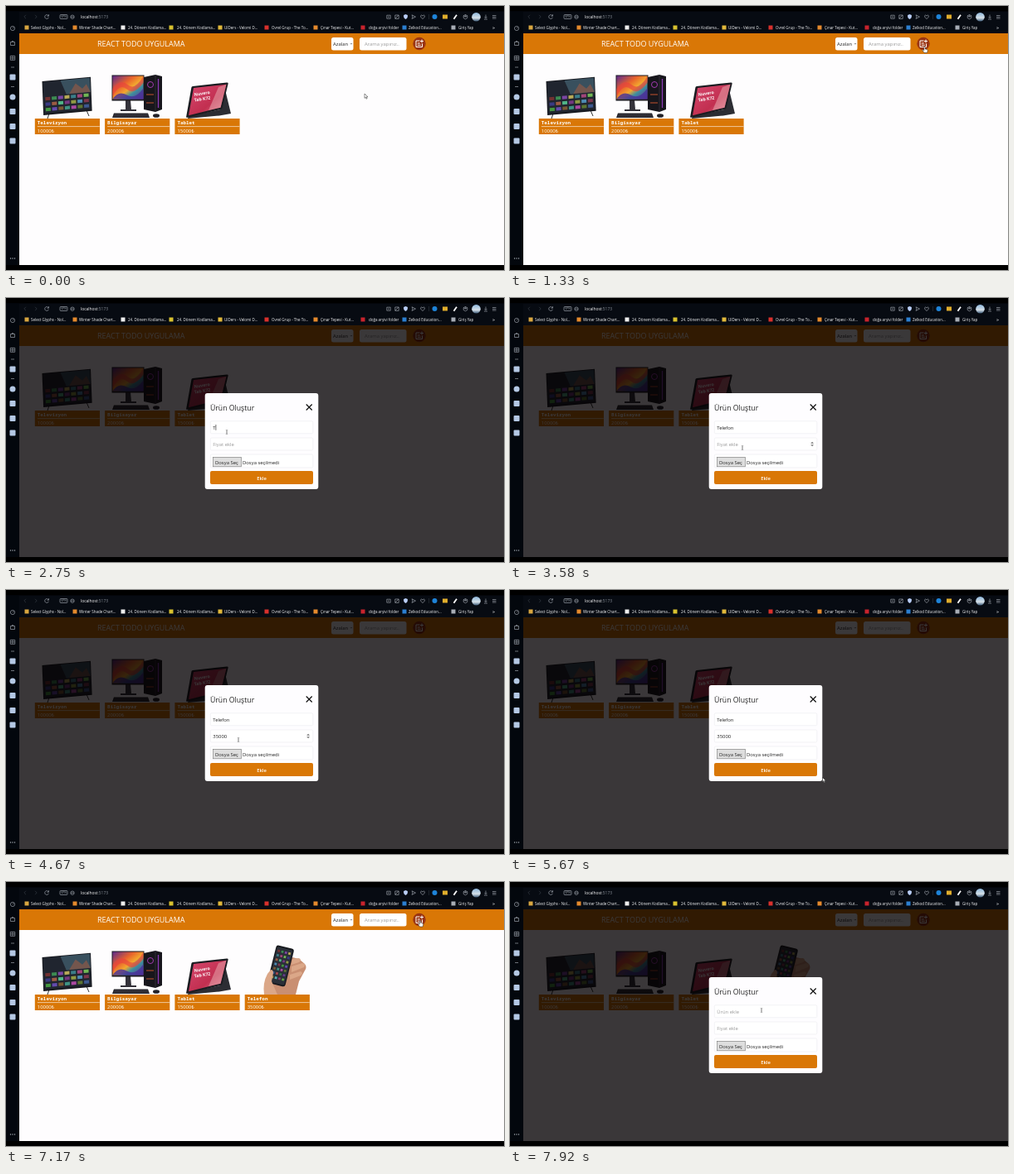
An HTML page for the animation above (8 s loop, 600x319 px).

```html
<!DOCTYPE html>
<html lang="tr">
<head>
<meta charset="utf-8">
<title>Todo</title>
<style>
  html, body { margin: 0; width: 100%; height: 100%; overflow: hidden; background: #000; }
  svg { display: block; width: 100%; height: 100%; }
  text { font: 5.9px "Open Sans", "Noto Sans", sans-serif; fill: #222; white-space: pre; }
  .title { font-size: 9px; fill: #fff; }
  .mark { font-size: 4.5px; fill: #f4f5f7; }
  .name { font: bold 5.9px "Noto Sans Mono", "DejaVu Sans Mono", monospace; fill: #fff; }
  .white { fill: #fff; }
  .hint { fill: #9a9a9a; }
  .line { fill: none; stroke: #9aa0a8; stroke-width: .7; }
  .orange { fill: #d97706; }
  .field { fill: #fff; stroke: #e9eaee; stroke-width: .6; }
</style>
</head>
<body>
<svg viewBox="0 0 600 319" preserveAspectRatio="none">
  <defs>
    <linearGradient id="wave" x2="1" y2="1">
      <stop stop-color="#5b2a8c"/><stop offset=".35" stop-color="#e8622c"/>
      <stop offset=".55" stop-color="#f3a72e"/><stop offset=".7" stop-color="#3c8ea0"/><stop offset="1" stop-color="#6b2789"/>
    </linearGradient>
    <linearGradient id="pink" x2="1" y2="1">
      <stop stop-color="#d6486f"/><stop offset=".6" stop-color="#c22f50"/><stop offset="1" stop-color="#e5879b"/>
    </linearGradient>
    <linearGradient id="sky" x2="0" y2="1">
      <stop stop-color="#8fb8dc"/><stop offset=".6" stop-color="#d5e0e8"/><stop offset="1" stop-color="#3c5a78"/>
    </linearGradient>
  </defs>

  <rect width="600" height="319"/>
  <rect y="6.5" width="600" height="306.5" fill="#070b12"/>
  <rect width="16" y="6.5" height="306.5" fill="#03070d"/>
  <g id="sidebar"></g>
  <g id="toolbar">
    <path class="line" style="stroke:#343a42" d="M24 10.800l-2.200 2.200 2.200 2.200M35 10.800l2.200 2.200-2.200 2.200"/>
    <path class="line" d="M51.300 12a2.400 2.400 0 1 0 .1 1.800M51.500 10.200v2h-2"/>
    <rect class="line" x="65" y="10.500" width="9" height="5" rx="1"/>
    <text x="66.200" y="14.400" style="font-size:3.400px;fill:#9aa0a8">VPN</text>
    <circle class="line" cx="80" cy="13.200" r="2.200"/><path class="line" d="M78 13.200h4"/>
    <text x="90" y="15" style="font-size:4.900px" class="white">localhost<tspan fill="#8a9099">:5173</tspan></text>
    <path class="line" d="M458.800 11.200h4.400v4h-4.400zM460 13.200h2M468.800 11h4.400v4.400h-4.400zM469 15l4-4M489 10.800l4.500 2.300-4.500 2.300 1-2.300zM502 15.700l-2.300-2.500q-.5-2 1-2.200l1.300 1 1.300-1q1.500.200 1 2.200zM553.500 10.500l2.300 1.200v2.800l-2.300 1.300-2.300-1.300v-2.800zl0 2.600 2.300-1.300m-2.300 1.300-2.300-1.300M578 10.500v4m-1.500-1.500l1.500 1.500 1.500-1.500M576 16h4M586 11.500h4.500M586 13.300h4.500M586 15h4.500"/>
    <path d="M481.500 10l2.400 1v2q-.2 2-2.400 3-2.200-1-2.400-3v-2z" fill="#b9cdf5"/>
    <path d="M509.500 10v6" stroke="#30363e" stroke-width=".6"/>
    <circle cx="516.500" cy="13" r="3" fill="#1e83d8"/>
    <rect x="526" y="10.500" width="6" height="5" fill="#e0ad2c"/>
    <path d="M539.500 15.800l3.500-5" stroke="#fff" stroke-width="1.800"/>
    <circle cx="566.500" cy="13.300" r="5.300" fill="url(#sky)"/>
  </g>
  <g id="bookmarks"></g>

  <rect x="16" y="58" width="584" height="255" fill="#fefdfe"/>
  <rect class="orange" x="16" y="33" width="584" height="25"/>
  <text class="title" x="110" y="49">REACT TODO UYGULAMA</text>
  <rect class="white" x="392" y="38" width="26.500" height="15.500" rx="2.500"/>
  <text x="394" y="48">Azalan</text>
  <path d="M414.800 45l1.100 1.200 1.100-1.200" fill="none" stroke="#333" stroke-width=".6"/>
  <rect class="white" x="426" y="38" width="56.500" height="15.500" rx="2.500"/>
  <text class="hint" x="432" y="48">Arama yapınız..</text>
  <circle cx="498" cy="45.500" r="7.700" fill="#9a3412"/>
  <path d="M498.500 42h-4.500v7.500h7.500v-4M495.800 45h3M495.800 47.300h4M501 40.500v4M499 42.500h4" fill="none" stroke="#fff" stroke-width="1"/>

  <g id="tv">
    <path d="M52 130l-2 6M97 126l3 7" stroke="#333" stroke-width="1"/>
    <g transform="matrix(1 -.09 .04 1 43.500 91)">
      <rect width="58.500" height="41" fill="#17191f"/>
      <rect x="1" y="1" width="56.500" height="38" fill="#20252f"/>
      <path d="M22 1h35.500v17h-29z" fill="#39505e"/>
      <path d="M32 18l8-12 8 7 5-5 4.500 10z" fill="#74564d"/>
      <g id="tiles"></g>
    </g>
  </g>
  <g id="computer">
    <path d="M144 114h6l1 11h6v2h-19v-2h6z" fill="#34323a"/>
    <rect x="127.500" y="83.500" width="39" height="31" fill="#1c1b22"/>
    <rect x="128.500" y="84.500" width="37" height="28" fill="url(#wave)"/>
    <path d="M128.500 100q9-13 18-5t19-10.500v8q-11 16-20 8t-17 9z" fill="#e8433c" opacity=".65"/>
    <path d="M128.500 112.500q7-11 17-5t20-8v13z" fill="#46309a" opacity=".8"/>
    <path d="M166 86l14-3 8 2v40l-8 3-14-3z" fill="#17161c"/>
    <path d="M180 83v45" stroke="#3b3844" stroke-width=".7"/>
    <path d="M183.500 88v35" stroke="#8b3bb7" stroke-width="1.300"/>
    <circle cx="174" cy="95" r="3.500" fill="none" stroke="#a23bb0"/>
    <path d="M169 107h9M169 117h9" stroke="#c4522f"/>
    <path d="M130 129.500h41l2 5.500h-45z" fill="#25242b"/>
    <path d="M131 131.300h40M130 133.200h42" stroke="#56535e" stroke-width=".6" stroke-dasharray="1.500 .6"/>
    <ellipse cx="181" cy="132.500" rx="4" ry="2.300" fill="#222128"/>
  </g>
  <g id="tablet">
    <path d="M263 97l8 33-14 2.500-38 3.500 1-3 38-8z" fill="#2c2d33"/>
    <path d="M225 97l41-4.500q2-.2 1.600 1.600l-7 29q-.4 1.400-1.800 1.700l-40 10q-2 .4-1.600-1.400l6.200-35q.2-1.200 1.600-1.400z" fill="#1b1c21"/>
    <path d="M226 99l39.500-4.300-7 28-38.500 9.600z" fill="url(#pink)"/>
    <path d="M244 126l12-28 9.500-3.300-7 28z" fill="#eab0b4" opacity=".5"/>
    <g transform="translate(227 109) rotate(-9)">
      <text class="white" style="font-size:5.200px;font-weight:700">Nuvero<tspan x="-1" dy="6.500">Tab K72</tspan></text>
    </g>
  </g>
  <g id="phone">
    <path d="M318 136l4-20 23-25 8 2 7 6q3 4 0 8l-7 13-4 16z" fill="#c98f72"/>
    <g transform="translate(326 76) rotate(14)">
      <rect width="22" height="47" rx="3" fill="#15171c"/>
      <rect x="1.300" y="1.800" width="19.400" height="43.400" rx="2" fill="#2a2f38"/>
      <g id="apps"></g>
    </g>
    <path d="M311 136q-2-14 4-25l4-5q3 0 3 4l-2 10 7 16z" fill="#dba788"/>
    <path d="M345 93l8-1q4 2 0 5l-9 3zM344 102l13-4q5 1 2 5l-15 6zM342 112l13-4q4 2 0 5l-13 5z" fill="#dba788"/>
  </g>
  <g id="cards"></g>

  <g id="modal">
    <rect x="16" y="33" width="584" height="280" fill="#030002" opacity=".78"/>
    <rect x="239.700" y="115" width="136.600" height="116" rx="3" fill="#fefdff"/>
    <text x="246" y="136" style="font-size:8.700px">Ürün Oluştur</text>
    <path d="M361.700 128.500l7 7m0-7l-7 7" stroke="#111" stroke-width="1.200"/>
    <rect class="field" x="246.300" y="148.800" width="123.500" height="15" rx="1.500"/>
    <rect class="field" x="246.300" y="169" width="123.500" height="15" rx="1.500"/>
    <rect class="field" x="246.300" y="189" width="123.500" height="16" rx="1.500"/>
    <text id="product" x="249.300" y="158.500"></text>
    <text id="price" x="249.300" y="178.700"></text>
    <path id="spinner" d="M362.200 175.700l1.900-2 1.900 2zM362.200 177.200l1.900 2 1.900-2z" fill="#777"/>
    <path id="caret" stroke="#111" stroke-width=".6"/>
    <rect x="249.500" y="192.300" width="34" height="11.500" fill="#dedede" stroke="#777" stroke-width=".6"/>
    <text x="252" y="200.500">Dosya Seç</text>
    <text x="285" y="200.500">Dosya seçilmedi</text>
    <rect class="orange" x="246" y="209" width="124" height="16" rx="2"/>
    <text class="white" x="308" y="219.500" text-anchor="middle" style="font-weight:600">Ekle</text>
  </g>

  <g id="pointer">
    <path id="arrow" d="M0 0v5.400l1.300-1.200.9 2 .9-.4-.9-1.900h1.800z" fill="#fff" stroke="#222" stroke-width=".5"/>
    <path id="hand" d="M-.7 0q.7-.8 1.400 0v2.500l2.300.6q.9.300.7 1.400l-.6 2.500h-3.600l-2-2.800q0-1 1.100-.6l.7.600z" fill="#fff" stroke="#222" stroke-width=".5"/>
    <path id="beam" d="M-1.200-2.600q1.200 0 1.200.7v3.800q0 .7-1.200.7M1.200-2.600q-1.200 0-1.200.7v3.800q0 .7 1.200.7" fill="none" stroke="#666" stroke-width=".5"/>
  </g>
</svg>
<script>
const el = id => document.getElementById(id);
const show = (id, on) => { el(id).style.display = on ? "" : "none"; };
const LOOP = 8000, STEP = 1000 / 12;
const FIRST_OPEN = 1560, PRODUCT_FOCUS = 2600, PRICE_FOCUS = 3800, BLUR = 5300;
const SUBMIT = 6230, PHOTO_LOADED = 6620, SECOND_OPEN = 7380;

// Browser chrome
el("bookmarks").innerHTML = [
  [25, 30, "#d8a640", "Select Glyphs - Nol..."],
  [83, 88, "#e58a2c", "Winter Shade Chart..."],
  [141, 147, "#eeeeee", "24. Dönem Kodlama..."],
  [199, 206, "#d9c22f", "24. Dönem Kodlama..."],
  [258, 263, "#e2b93b", "UIDers - Velomi D..."],
  [314, 320, "#d8302c", "Ovrel Grup - The To..."],
  [373, 379, "#e58a2c", "Çınar Tepesi - Kut..."],
  [430, 437, "#c8232c", "doğa arşivi folder"],
  [480, 485, "#2b7fd0", "Zelkod Education..."],
  [539, 545, "#a8adb5", "Giriş Yap"]
].map(([icon, x, color, label]) =>
  `<rect x="${icon - 2.5}" y="23.5" width="5" height="5" fill="${color}"/>
   <text class="mark" x="${x}" y="27.700">${label}</text>`).join("") +
  `<text class="mark" x="586" y="28" style="font-size:6px">»</text>`;

el("sidebar").innerHTML = `
  <circle class="line" cx="8" cy="27" r="2.600"/><path class="line" d="M8 27l1.500-1.500"/>
  <path class="line" d="M5.500 43.500h5v4h-5zM6.700 43.500q1.300-3 2.600 0M5.300 60.300h5.400v5h-5.400zM5.300 62.800h5.400M8 60.300v5M6 74h4M6 97.500h4"/>` +
  [[86, 1], [110, 3.5], [127.5, 1], [145.5, 1], [163, 1]].map(([y, round]) =>
    `<rect x="4.500" y="${y - 3.5}" width="7" height="7" rx="${round}" fill="#b4c8e4"/>`).join("") +
  [5.5, 8, 10.5].map(x => `<circle cx="${x}" cy="305" r=".7" fill="#b0b5bd"/>`).join("");

// Product cards and their screens
const card = ([name, price], i) => {
  const x = 34.8 + i * 84.3;
  return `<g id="card${i}"><rect class="orange" x="${x}" y="136" width="78.200" height="19"/>
    <text class="name" x="${x + 3}" y="142.500">${name}</text>
    <path d="M${x + 3} 145.600h75" stroke="#fff" stroke-width=".6"/>
    <text class="white" x="${x + 3}" y="153">${price}₺</text></g>`;
};
el("cards").innerHTML = [["Televizyon", 10000], ["Bilgisayar", 20000], ["Tablet", 15000], ["Telefon", 35000]]
  .map(card).join("");

const tileGrid = (cols, rows, x, y, dx, dy, w, h) =>
  Array.from({ length: cols * rows }, (_, i) =>
    `<rect x="${x + i % cols * dx}" y="${y + Math.floor(i / cols) * dy}" width="${w}" height="${h}"
      fill="hsl(${i * 137 % 360} 40% ${32 + i * 7 % 22}%)"/>`).join("");
el("tiles").innerHTML = tileGrid(7, 3, 3, 19.5, 7.7, 6.5, 6, 4);
el("apps").innerHTML = tileGrid(4, 7, 3, 5, 4.4, 5.4, 2.8, 2.8);

// Pointer stops: time, x, y
const stops = [
  [0, 432, 106], [500, 432, 106], [1250, 499.5, 49.5], [1750, 499.5, 49.5],
  [2330, 266, 162], [3300, 266, 162], [3580, 280, 181], [5080, 280, 181],
  [5580, 376.5, 226.5], [5670, 376.5, 226.5], [6050, 306.5, 216.5], [6500, 306.5, 216.5],
  [7080, 499, 47], [7560, 499, 47], [7900, 303, 155], [LOOP, 303, 155]
];
function pointerAt(t) {
  const i = Math.max(1, stops.findIndex(s => s[0] > t));
  const [t0, x0, y0] = stops[i - 1], [t1, x1, y1] = stops[i];
  const p = (t - t0) / (t1 - t0), k = p * p * (3 - 2 * p);
  return [x0 + (x1 - x0) * k, y0 + (y1 - y0) * k];
}

const typed = (text, t, start, gap) =>
  text.slice(0, Math.max(0, Math.floor((t - start) / gap) + 1));

function setField(id, value, hint) {
  el(id).textContent = value || hint;
  el(id).setAttribute("class", value ? "" : "hint");
}

function draw(t) {
  const fresh = t >= SECOND_OPEN;
  const open = (t >= FIRST_OPEN && t < SUBMIT) || fresh;
  const [x, y] = pointerAt(t);
  const inside = (left, top, right, bottom) => x > left && x < right && y > top && y < bottom;
  show("modal", open);
  show("card3", t >= SUBMIT);
  show("phone", t >= PHOTO_LOADED);

  const product = fresh ? "" : typed("Telefon", t, 2700, 95);
  const price = fresh ? "" : typed("35000", t, 4050, 150);
  setField("product", product, "Ürün ekle");
  setField("price", price, "Fiyat ekle");

  const onPrice = t >= PRICE_FOCUS && t < BLUR;
  const onProduct = t >= PRODUCT_FOCUS && t < PRICE_FOCUS;
  const overPrice = inside(246, 169, 370, 184);
  show("spinner", onPrice || overPrice);
  const blinkOn = (t - (onPrice ? PRICE_FOCUS : PRODUCT_FOCUS)) % 1000 < 500;
  show("caret", open && (onProduct || onPrice) && blinkOn);
  if (open) {
    const value = onPrice ? price : product;
    const caretX = 249.6 + (value ? el(onPrice ? "price" : "product").getComputedTextLength() : 0);
    el("caret").setAttribute("d", `M${caretX} ${onPrice ? 173.2 : 153}v6.800`);
  }

  const beam = open && (inside(246, 149, 370, 164) || overPrice);
  const hand = open ? inside(246, 209, 370, 225) : Math.hypot(x - 498, y - 45.5) < 8;
  show("beam", beam);
  show("hand", hand);
  show("arrow", !beam && !hand);
  el("pointer").setAttribute("transform", `translate(${x} ${y})`);
}

const began = performance.now();
function tick() {
  const t = (performance.now() - began) % LOOP;
  draw(Math.floor((t + 5) / STEP) * STEP % LOOP);
  requestAnimationFrame(tick);
}
tick();
</script>
</body>
</html>
```
